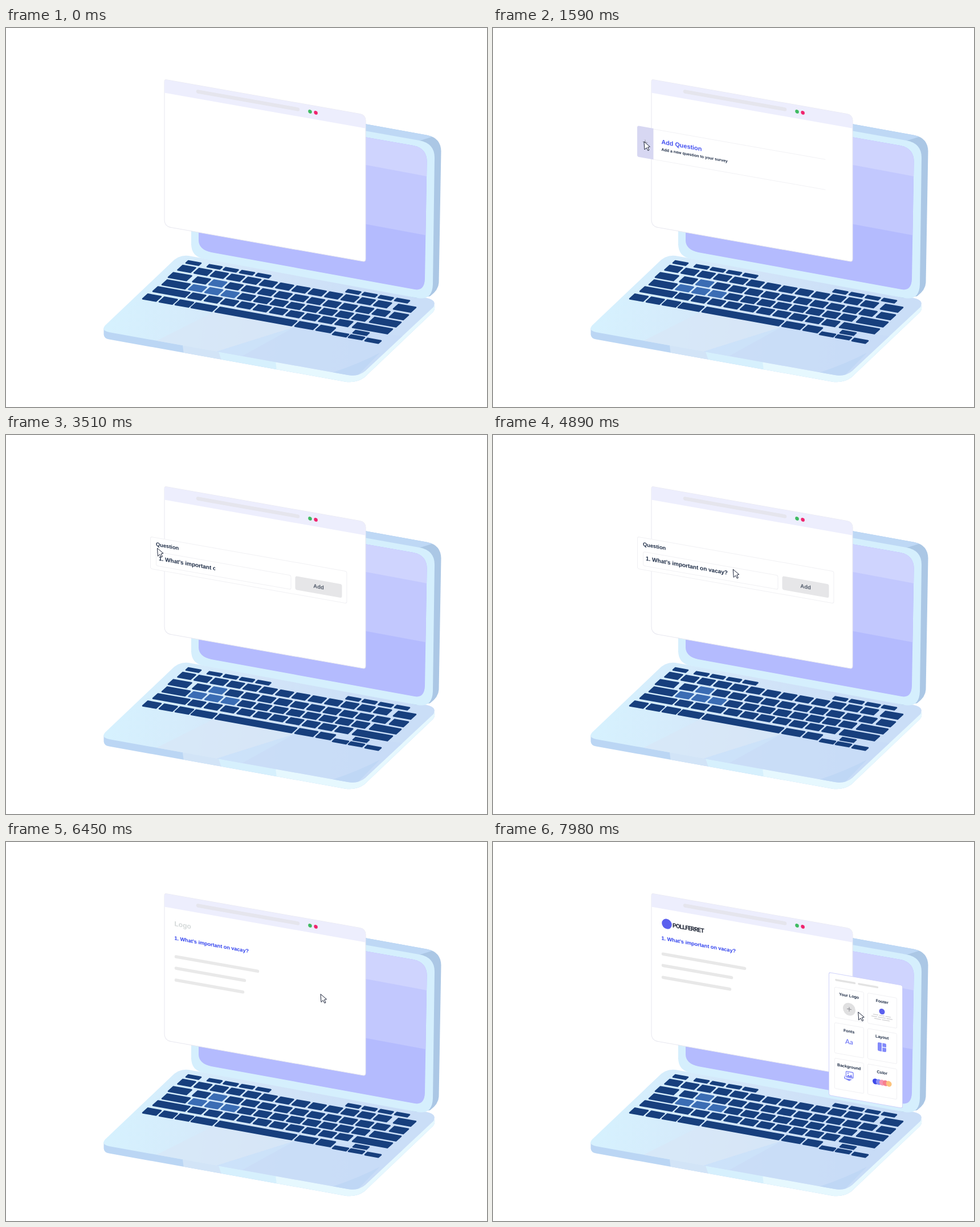
Animation of 844 by 664 pixels, one loop 8000 ms. Source, as an HTML page:

```html
<!DOCTYPE html>
<html lang="en">
<head>
<meta charset="utf-8">
<title>Survey builder</title>
<style>
  html, body { margin: 0; width: 100%; height: 100%; overflow: hidden; background: #fff; }
  svg { display: block; width: 844px; height: 664px; }
  text { font-family: "Liberation Sans", Arial, sans-serif; font-weight: 700; fill: #1c2b45; }
  .mid { text-anchor: middle; }
  .small { font-size: 7.1px; }
  .line { fill: none; stroke-linecap: round; }
  .edge { fill: #fff; stroke: #f0f0f3; }
</style>
</head>
<body>
<svg viewBox="0 0 844 664">
  <defs>
    <linearGradient id="deckFill" gradientUnits="userSpaceOnUse" x1="190" y1="480" x2="640" y2="560">
      <stop offset="0" stop-color="#d6f1fe"/>
      <stop offset=".3" stop-color="#d5ebfb"/>
      <stop offset=".55" stop-color="#d2e4f8"/>
      <stop offset="1" stop-color="#cadef7"/>
    </linearGradient>
    <clipPath id="deckClip"><use href="#deck"/></clipPath>
    <clipPath id="sideClip"><use href="#side"/></clipPath>
    <clipPath id="screenClip"><path d="M338 140L715 206Q738.5 211 738.5 234L735 440Q734 461 717 458L360 393Q338 388 338 372Z"/></clipPath>
    <clipPath id="typeClip"><rect id="typed" x="-20" y="110" width="0" height="40"/></clipPath>
    <clipPath id="btnClip"><rect x="229.5" y="116.5" width="81.5" height="23.5" rx="3"/></clipPath>
  </defs>

  <!-- base -->
  <path id="side" fill="#bbd6f4" d="M171.500 526V537Q172 544 181 545.500L594 619.500Q614 623 629 612L749 498Q753 494 752 486L612 600L300 545Z"/>
  <g clip-path="url(#sideClip)">
    <path fill="#d2e4f7" d="M308 540L313 580H380L366 540Z"/>
    <path fill="#d6f0fd" d="M364 540L384 600H480L470 540Z"/>
    <path fill="#e6f8fe" d="M470 560L480 640H770V470L612 600Z"/>
  </g>
  <path id="deck" fill="url(#deckFill)" d="M320 399L738 473Q757 477 750 489L630 601Q618 611 600 608L181 533Q166 530 174 521L290 411Q303 397 320 399Z"/>
  <g clip-path="url(#deckClip)">
    <path fill="#d8e7f7" opacity=".75" d="M370 495L262 549L366 568L506 524Z"/>
    <path fill="#c8ddf8" opacity=".8" d="M506 524L366 568L382 575L620 615L700 540L600 530Z"/>
    <path fill="#cde4fb" opacity=".7" d="M506 524L366 568L412 576Z"/>
    <path fill="#bfd7f5" d="M656 569Q620 588 572 604L610 616Z"/>
  </g>

  <!-- lid -->
  <path fill="#abc7e5" d="M325 113L740 188Q763 193 763.500 216L759.500 446Q759 459 744 470L720 473L325 380Z"/>
  <path fill="#bed8f5" d="M325 113L738 187.500L748 190.500L724 198L325 128Z"/>
  <path fill="#d5effd" d="M325 126L725 197Q752 202 752 227L749 449Q748 478 722 473L346 404Q325 400 325 378Z"/>
  <g clip-path="url(#screenClip)">
    <path fill="#b4bbfe" d="M330 100H745V480H330Z"/>
    <path fill="#c2c8fe" d="M330 100H745V364.500L330 288Z"/>
    <path fill="#cfd4fe" d="M330 100H745V261L330 184Z"/>
  </g>
  <g id="keys" stroke-width="2.600" stroke-linejoin="round"></g>

  <g transform="translate(278 90) skewY(10)">
    <!-- window -->
    <path fill="#fff" stroke="#e7e7ef" d="M4 0H343Q353 0 353 10V252.500Q353 257.500 348 257.500H12Q0 257.500 0 245.500V4Q0 0 4 0Z"/>
    <path fill="#edeefd" d="M4 0H343Q353 0 353 10V23.500H0V4Q0 0 4 0Z"/>
    <path class="line" stroke="#e5e5ed" stroke-width="6.500" d="M59 11.200H234"/>
    <circle cx="255.500" cy="11.400" r="3.300" fill="#3fbb62"/>
    <circle cx="265.600" cy="11.600" r="3.300" fill="#f0246e"/>

    <g id="card">
      <path fill="#fff" d="M0 86.500H305V139.500H0Z"/>
      <path class="line" stroke="#f1f1f4" d="M3 86.500H305M3 139.500H305"/>
      <path id="plusBox" d="M-22 85.500H3.500V140H-22Q-25 140 -25 137V88.500Q-25 85.500 -22 85.500Z"/>
      <path id="plus" class="line" d="M-15 112H-7M-11 108V116"/>
      <text x="17.500" y="110" font-size="10.800" style="fill:#4350f0">Add Question</text>
      <text x="17.500" y="122" font-size="7">Add a new question to your survey</text>
    </g>

    <g id="form">
      <rect class="edge" x="-24.500" y="92.500" width="344.500" height="56" rx="3"/>
      <text x="-15" y="107" font-size="9.300">Question</text>
      <rect class="edge" x="-14.500" y="117" width="236.500" height="24.500" rx="3"/>
      <rect x="229.500" y="116.500" width="82" height="24" rx="3" fill="#e6e6e8"/>
      <text class="mid" x="270.500" y="131.500" font-size="9.500" style="fill:#4f5868">Add</text>
    </g>
    <g id="answer">
      <text x="-10" y="131.300" font-size="10" clip-path="url(#typeClip)">1. What’s important on vacay?</text>
    </g>
    <g id="button">
      <g clip-path="url(#btnClip)">
        <path fill="#6a70fb" d="M229 116H312V141H229Z"/>
        <path id="sheen" fill="#8a8ffd" d="M243 116H400V141H234L260 122.500Z"/>
      </g>
      <text class="mid" x="270.500" y="131.500" font-size="9.500" style="fill:#fff">Add</text>
    </g>

    <!-- result page -->
    <g id="head">
      <text id="logo" x="17.500" y="54" font-size="12" style="fill:#d3d8d8">Logo</text>
      <text x="17.500" y="78.200" font-size="9.070" style="fill:#3041ee">1. What’s important on vacay?</text>
    </g>
    <path id="lines" class="line" stroke="#e8e8e8" stroke-width="5.500" d="M20.500 102.600H163.500M20.500 122.800H140.500M20.500 143.600H137.500"/>
    <g id="brand">
      <circle cx="27" cy="48.800" r="8.800" fill="#5b60ee"/>
      <text x="37" y="53" font-size="10.500" letter-spacing="-.8" style="font-family:Roboto,sans-serif;fill:#1c2333">POLLFERRET</text>
    </g>

    <g id="panel">
      <rect x="311.500" y="83.500" width="129" height="215" rx="3" fill="#fff" stroke="#cfd2fb"/>
      <path class="line" stroke="#e3e3e3" stroke-width="3.500" d="M324 94.500H356.500M364 94.500H396.500"/>
      <g id="cells"></g>
      <circle cx="347" cy="141.800" r="11" fill="#e0e0e1"/>
      <path class="line" stroke="#85858c" d="M343.500 141.800H350.500M347 138.300V145.300"/>
      <circle cx="404.500" cy="135.700" r="5" fill="#5b60ee"/>
      <path fill="none" stroke="#cdcdd0" stroke-width="1.300" d="M389 143H398M399.500 143H409M410.500 143H420M386 146.500H396M397.500 146.500H411M412.500 146.500H423M391 150H403M404.500 150H418"/>
      <text class="mid" x="347" y="203" font-size="11.500" style="font-family:Lato,sans-serif;fill:#7b82f7">Aa</text>
      <path fill="#828afa" d="M399 190.700H404V205.700H399Q397 205.700 397 203.700V192.700Q397 190.700 399 190.700ZM405.300 190.700H410Q412 190.700 412 192.700V197.300H405.300ZM405.300 198.600H412V203.700Q412 205.700 410 205.700H405.300Z"/>
      <g fill="#7b82f7">
        <rect x="341.500" y="251.500" width="12.500" height="10" rx="1" fill="#fff" stroke="#7b82f7" stroke-width="1.300"/>
        <path d="M342.500 260.500L345.500 256.500L348 259L350.500 255.500L353 260.500Z"/>
        <circle cx="345" cy="254.300" r="1.200"/>
        <path d="M339 258L340 264H352L347 267.500L338 264.500Z"/>
      </g>
      <g id="swatches"></g>
    </g>
  </g>

  <path id="cursor" fill="#fff" stroke="#1a2238" stroke-linejoin="round" d="M0 0L1 14L4.300 10.800L7 15.800L9 14.800L6.600 9.800L10.500 9Z"/>
</svg>

<script>
const LOOP = 8000, STEP = 30, SLIDE = 60;
const $ = id => document.getElementById(id);

function add(parent, tag, attrs, text) {
  const el = document.createElementNS("http://www.w3.org/2000/svg", tag);
  for (const k in attrs) el.setAttribute(k, attrs[k]);
  if (text) el.textContent = text;
  parent.appendChild(el);
}

// A key fills the slanted box from x1 to x2 on the row line y = c + .18x.
function key(c, x1, x2, h = 9.6, lit = false) {
  const lean = h * .92, inset = 2, color = lit ? "#3b6db4" : "#173f7d";
  const left = x1 + inset, right = x2 - inset;
  const pts = [[left + lean, -h / 2], [right, -h / 2], [right - lean, h / 2], [left, h / 2]];
  add($("keys"), "polygon", {
    points: pts.map(([x, d]) => x + "," + (c + d + .18 * x)).join(" "),
    fill: color, stroke: color
  });
}
function keyRow(c, first, count, lit = []) {
  for (let i = 0; i < count; i++) {
    const x = first + 28.65 * i;
    key(c, x - 17.5, x + 17.5, 9.6, lit.includes(i));
  }
}
for (const x of [329, 366, 394.5, 423, 451.5, 609.5, 638, 666.5, 695]) key(352.6, x - 15, x + 15, 4.4);
keyRow(365, 317, 13);
key(365, 678, 721);
keyRow(380.6, 343, 12, [1]);
keyRow(395.5, 336, 11, [0, 1, 2]);
keyRow(410.2, 335, 10);
for (const [c, a, b] of [[380.6, 283, 327.5], [380.6, 671, 708], [395.5, 272, 325],
  [395.5, 636, 695], [410.2, 256, 324.5], [410.2, 606, 680]]) key(c, a, b);
for (const [a, b] of [[238, 274], [267, 302.5], [295, 331], [323, 372], [365, 512], [505, 549], [542, 580]]) key(426.4, a, b);
key(431.2, 571, 603, 5);
key(422, 607, 639, 5);
key(431.2, 599, 631, 5);
key(432, 628, 660, 5);

["Your Logo", "Footer", "Fonts", "Layout", "Background", "Color"].forEach((name, i) => {
  const x = 321.5 + 58 * (i % 2), y = 107.5 + 62.2 * (i >> 1);
  add($("cells"), "rect", { class: "edge", x, y, width: 51, height: 53, rx: 2 });
  add($("cells"), "text", { class: "mid small", x: x + 25.2, y: y + 13.2 }, name);
});
["#3f4ae8", "#8a90f8", "#f495b4", "#f77f8e", "#fcc37e"].forEach((fill, i) =>
  add($("swatches"), "circle", { cx: 393 + 5.9 * i, cy: 260.2, r: 5, fill }));

const clamp = v => Math.min(1, Math.max(0, v));
const ramp = (t, start, dur) => clamp((t - start) / dur);
const ease = (t, start, dur) => .5 - .5 * Math.cos(Math.PI * ramp(t, start, dur));
const mix = (a, b, p) => a + (b - a) * p;
const blend = (a, b, p) => `rgb(${a.map((v, i) => Math.round(mix(v, b[i], p)))})`;

function place(id, dy, alpha) {
  $(id).setAttribute("transform", `translate(0 ${dy})`);
  $(id).setAttribute("opacity", clamp(alpha));
}
// Slides in from a distance, then leaves downwards.
function pass(id, t, inAt, inDur, from, outAt = Infinity) {
  const a = ease(t, inAt, inDur), b = ease(t, outAt, 300);
  place(id, from * (1 - a) + SLIDE * b, a * (1 - 1.1 * b));
}

// Cursor stops: start, duration, x, y
const stops = [
  [1120, 520, 265.5, 198.3],
  [4510, 720, 552, 266.5],
  [6940, 460, 625, 287],
  [7780, 260, 643, 299.5]
];
function moveCursor(t) {
  let x = 242, y = 231;
  for (const [start, dur, tx, ty] of stops) {
    const p = ease(t, start, dur);
    x = mix(x, tx, p);
    y = mix(y, ty, p);
  }
  $("cursor").setAttribute("transform", `translate(${x} ${y})`);
  $("cursor").setAttribute("opacity", ramp(t, 240, 300));
}

function draw(t) {
  pass("card", t, 100, 450, -SLIDE, 2002);
  const hover = ease(t, 1520, 270);
  $("plusBox").setAttribute("fill", blend([230, 229, 239], [132, 137, 255], hover));
  $("plus").setAttribute("stroke", blend([130, 130, 144], [255, 255, 255], hover));

  pass("form", t, 2010, 450, -SLIDE, 5548);
  pass("answer", t, 2010, 450, -SLIDE, 5568);
  $("typed").setAttribute("width", Math.max(0, 23 + .13 * (t - 2847)));

  const shown = ease(t, 5000, 300), gone = ease(t, 5568, 300);
  place("button", 14 * (1 - shown) + SLIDE * gone, shown * (1 - gone) * 1.25);
  $("sheen").setAttribute("transform", `translate(${90 * (1 - ramp(t, 5370, 300))} 0)`);

  pass("head", t, 5850, 450, SLIDE);
  pass("lines", t, 6083, 450, SLIDE);
  pass("panel", t, 6490, 430, -SLIDE);
  const swap = ease(t, 7420, 310);
  $("logo").setAttribute("opacity", 1 - swap);
  $("brand").setAttribute("opacity", swap);
  moveCursor(t);
}

function tick() {
  const t = performance.now() % LOOP;
  draw(Math.floor(t / STEP) * STEP);
  requestAnimationFrame(tick);
}
tick();
</script>
</body>
</html>
```
